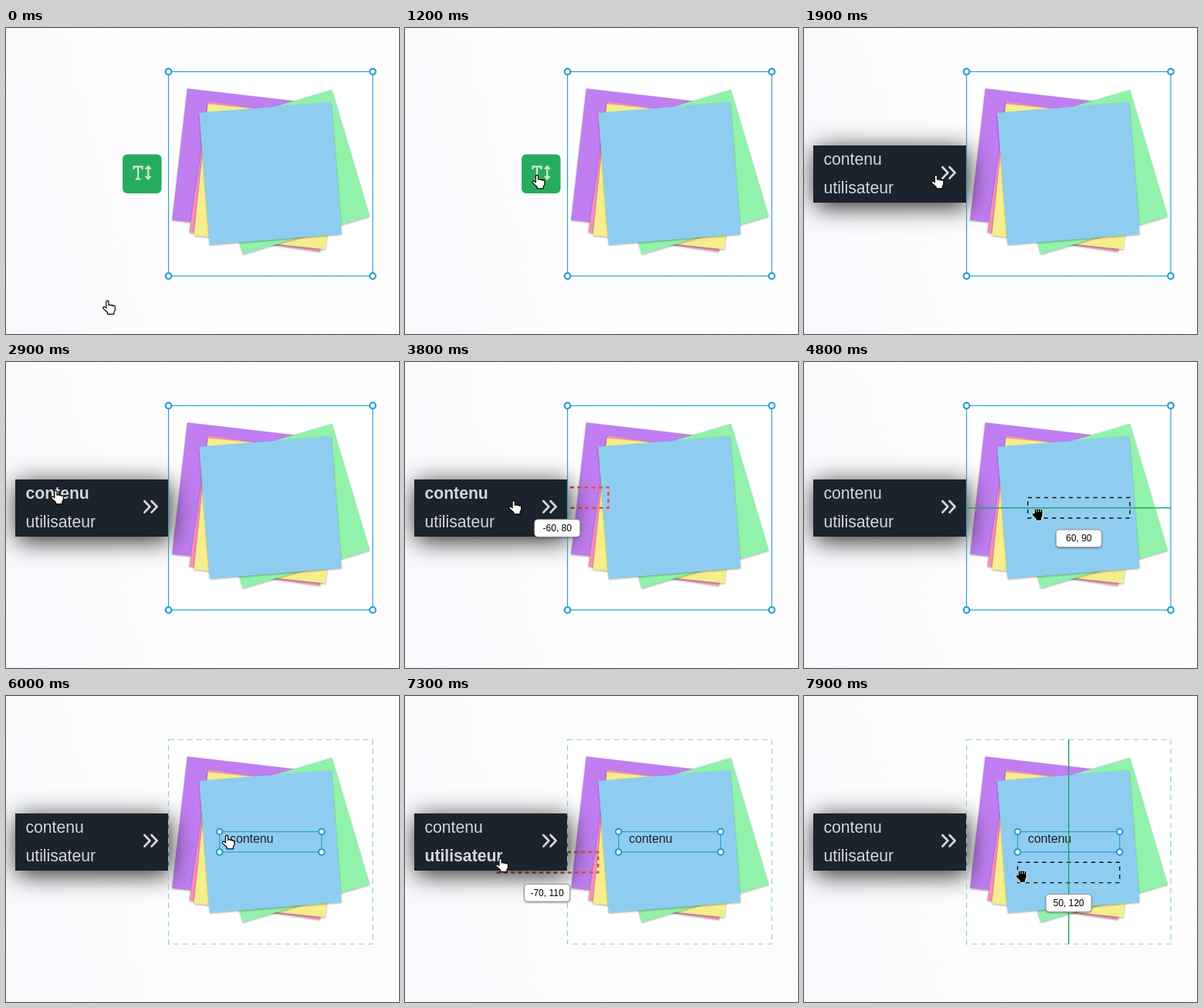
An HTML page for the animation above (8 s loop, 509 by 396 pixels).

```html
<!DOCTYPE html>
<html lang="fr">
<head>
<meta charset="utf-8">
<style>
html, body { margin: 0; width: 100%; height: 100%; overflow: hidden; }
body { background: linear-gradient(75deg, #f8f9fd, #fdfdfe 45%, #fefefe); }
svg { display: block; width: 509px; height: 396px; font-family: "Liberation Sans", Arial, sans-serif; }
.note { filter: drop-shadow(0 1px 1px #0005); }
.panel { fill: #1b232c; filter: drop-shadow(2px 5px 16px #000d); }
.menu { font-size: 21.16px; fill: #d5d7da; }
.edge { fill: none; stroke: #2a9fd0; stroke-width: 1.2; }
.dashed { stroke: #8ecbe0; stroke-dasharray: 7 5; }
.handle { fill: #fff; stroke: #2a9fd0; stroke-width: 2.2; }
.guide { stroke: #1fa866; stroke-width: 1.5; }
.tip rect { fill: #fff; stroke: #999; filter: drop-shadow(0 1px 1px #0006); }
.tip text { font-size: 12px; text-anchor: middle; }
#point { fill: #fff; stroke: #000; stroke-width: 1.2; stroke-linejoin: round; }
#grab { fill: #000; stroke: #fff; stroke-width: .9; stroke-linejoin: round; }
</style>
</head>
<body>
<svg viewBox="0 0 509 396">
  <rect x="210.5" y="56.5" width="264.5" height="264.5" fill="#fff"/>
  <g id="notes"></g>
  <text id="label" x="290" y="190" font-size="15.87" fill="#222">contenu</text>
  <rect id="ghost" width="132.25" height="26.45" fill="none"/>
  <g id="button">
    <rect x="151" y="163.5" width="50.5" height="50.5" rx="6" fill="#27ac5f"/>
    <g fill="none" stroke="#d3e7d9" stroke-width="2.2">
      <path d="M165.5 183V179.3H176.5V183M171 179.3V195M167.8 195.3H174.2"/>
      <path d="M184.2 181V193M181 182.5L184.2 179L187.4 182.5M181 191.8L184.2 195.3L187.4 191.8"/>
    </g>
  </g>
  <g id="panel">
    <rect class="panel" x="12" y="152" width="198.5" height="74"/>
    <g class="menu">
      <text id="item0" x="25.5" y="177">contenu</text>
      <text id="item1" x="25.5" y="214">utilisateur</text>
    </g>
    <path d="M179.3 180L186.3 187.3L179.3 194.6M188.5 180L195.5 187.3L188.5 194.6" fill="none" stroke="#d5d7da" stroke-width="2.8" stroke-linejoin="round" stroke-linecap="round"/>
  </g>
  <g id="parentOn"></g>
  <rect id="parentOff" class="edge dashed" x="210.5" y="56.5" width="264.5" height="264.5"/>
  <g id="child"></g>
  <line id="across" class="guide" x2="475" y1="188.75" y2="188.75"/>
  <line id="down" class="guide" x1="342.75" x2="342.75" y1="56.5" y2="321"/>
  <g id="tip" class="tip">
    <rect x="-29.5" width="59" height="22.5" rx="4"/>
    <text id="coords" y="15.3"></text>
  </g>
  <g id="cursor">
    <path id="point" d="M5 10V2.2a1.6 1.6 0 0 1 3.2 0V6.5a1.6 1.3 0 0 1 2.9.4a1.5 1.3 0 0 1 2.7.6a1.5 1.4 0 0 1 2.7 1V12.5l-1.5 3V18H6.8V16L1.2 10.8a1.5 1.5 0 0 1 2-2.2Z"/>
    <path id="grab" d="M4 8V3.6a1.4 1.4 0 0 1 2.6-.6a1.5 1.5 0 0 1 2.8-.2a1.5 1.5 0 0 1 2.8.6a1.4 1.4 0 0 1 2.6.8V11l-1.5 3.5V17.5H6V15L2 11a1.6 1.6 0 0 1 2-3ZM6.7 3.5V6.5M9.4 3.5V6.5M12.1 4V6.5"/>
  </g>
</svg>
<script>
const $ = id => document.getElementById(id);
const show = (id, on) => $(id).style.display = on ? '' : 'none';
const set = (id, attrs) => { for (const k in attrs) $(id).setAttribute(k, attrs[k]); };

const LEFT = 210.5, TOP = 56.5, SCALE = 1.3225, STEP = 100, LOOP = 8000, NOTE = 171.3;

// One square sheet, turned about its centre
function note(fill, x, y, angle) {
  $('notes').innerHTML += `<g class="note"><rect x="${-NOTE / 2}" y="${-NOTE / 2}" width="${NOTE}" height="${NOTE}"
    fill="${fill}" transform="translate(${x} ${y}) rotate(${angle})"/></g>`;
}
note('#c07ef1', 310, 173.2, 6.6);
note('#f590b6', 334.6, 192.3, 8.4);
note('#f4ee8c', 337.6, 192.3, 6);
note('#90f2ab', 364.5, 186.2, -16.6);
note('#8fcdf0', 342.4, 188.2, -4.6);

function frame(id, x, y, w, h) {
  let html = `<rect class="edge" x="${x}" y="${y}" width="${w}" height="${h}"/>`;
  for (const cx of [x, x + w])
    for (const cy of [y, y + h])
      html += `<circle class="handle" cx="${cx}" cy="${cy}" r="3.8"/>`;
  $(id).innerHTML = html;
}
frame('parentOn', LEFT, TOP, 264.5, 264.5);
frame('child', 276.6, 175.6, 132.2, 26.4);

// Pointer moves; bow bends the path sideways, wave up then down
const home = { x: 133.5, y: 361.5 };
const moves = [
  { from: 200, to: 400, x: 140, y: 330 },
  { from: 500, to: 900, x: 173, y: 199, bow: 25 },
  { from: 2400, to: 2600, x: 161, y: 200 },
  { from: 2700, to: 2900, x: 66.5, y: 175 },
  { from: 3400, to: 4200, x: 219, y: 201, wave: 48 },
  { from: 4200, to: 4500, x: 292, y: 197 },
  { from: 4700, to: 4800, x: 303, y: 197 },
  { from: 4900, to: 5400, x: 288, y: 189 },
  { from: 6000, to: 6800, x: 123, y: 218.5 },
  { from: 7250, to: 7900, x: 282, y: 233 }
];
const drags = [
  { from: 3500, to: 5400, gripX: 17, gripY: 19.5 },
  { from: 7100, to: LOOP, gripX: 8, gripY: 17 }
];

const ease = k => k * k * (3 - 2 * k);

function pointer(t) {
  let { x, y } = home;
  for (const m of moves) {
    if (t <= m.from) break;
    const k = ease(Math.min(1, (t - m.from) / (m.to - m.from)));
    x += (m.x - x) * k + (m.bow || 0) * Math.sin(Math.PI * k);
    y += (m.y - y) * k - (m.wave || 0) * Math.sin(2 * Math.PI * k);
  }
  return [x, y];
}

const snap = px => Math.round(px / SCALE / 10) * 10;

function draw(now) {
  const t = Math.floor(now % LOOP / STEP) * STEP;
  const [cx, cy] = pointer(t);
  const open = t >= 1900, selected = t >= 6000;

  show('button', !open);
  show('panel', open);
  show('label', t >= 5400);
  show('child', selected);
  show('parentOn', !selected);
  show('parentOff', selected);

  const over = cx < 168 && cy > 161 && cy < 235;
  const hovered = over ? (cy < 205 ? 0 : 1) : -1;
  for (const i of [0, 1]) set('item' + i, { 'font-weight': hovered === i ? 'bold' : 'normal' });

  const drag = drags.find(d => t >= d.from && t < d.to);
  let x, y, fits = false;
  if (drag) {
    x = snap(cx - drag.gripX - LEFT);
    y = snap(cy - drag.gripY - TOP);
    fits = x >= 0 && x <= 100 && y >= 0 && y <= 180;
    const px = LEFT + x * SCALE, py = TOP + y * SCALE;
    set('ghost', {
      x: px, y: py,
      stroke: fits ? '#111' : '#e2503f',
      'stroke-width': fits ? 1.4 : 2.6,
      'stroke-dasharray': fits ? '5.3 5.3' : '5 4.2'
    });
    set('across', { x1: Math.min(px, LEFT) });
    set('tip', { transform: `translate(${px + 66.1} ${py + 41.5})` });
    $('coords').textContent = `${x}, ${y}`;
  }
  show('ghost', drag);
  show('tip', drag);
  show('across', drag && y === 90);
  show('down', drag && x === 50);
  show('grab', fits);
  show('point', !fits);
  set('cursor', { transform: `translate(${cx - 8.7} ${cy - 9.2})` });
}

const start = performance.now();
function tick() {
  draw(performance.now() - start);
  requestAnimationFrame(tick);
}
tick();
</script>
</body>
</html>
```
